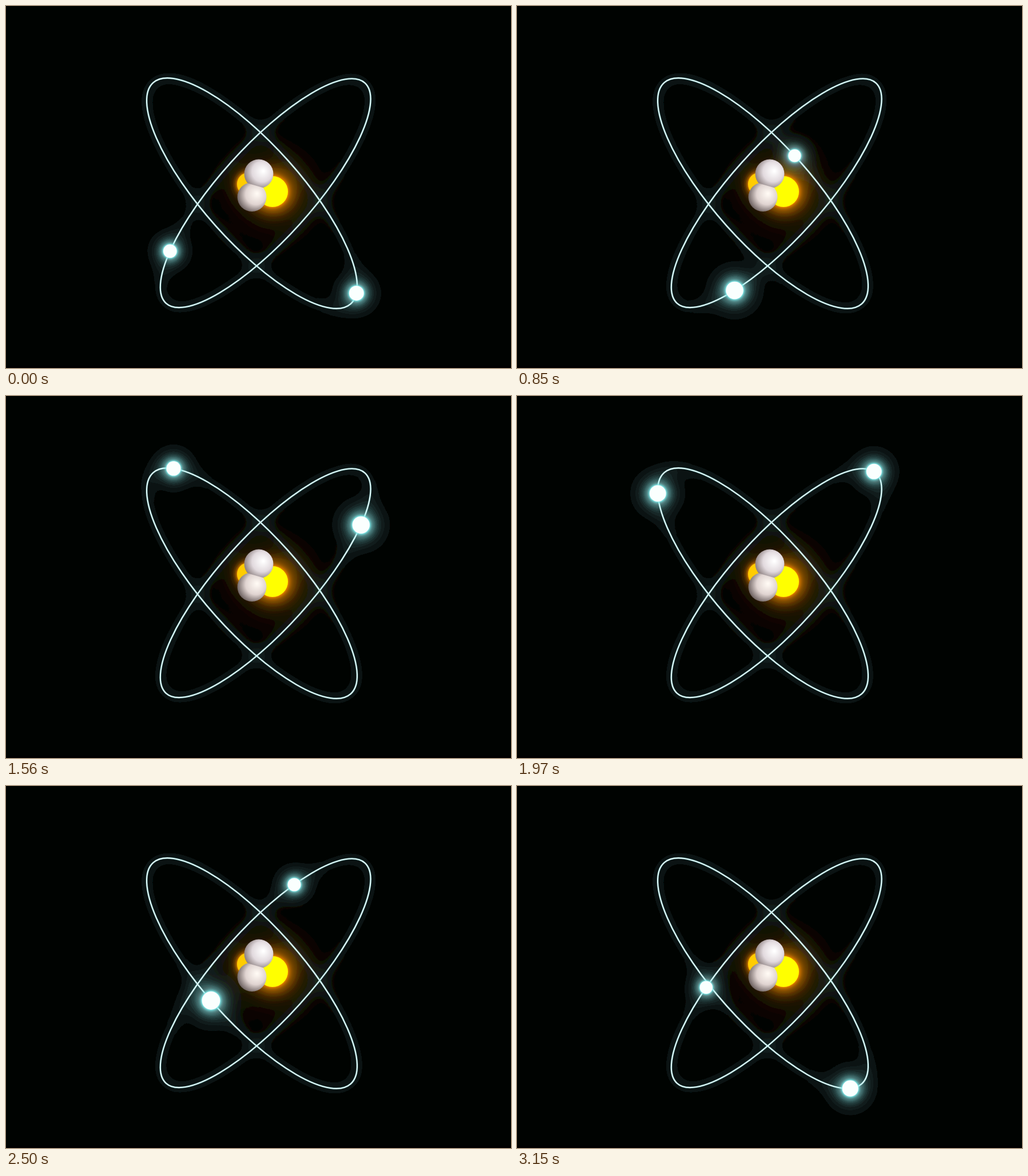
An HTML page with a canvas for the animation above (3250 ms loop, 883 by 634 pixels).

```html
<!DOCTYPE html>
<html lang="en">
<head>
<meta charset="utf-8">
<title>Atom</title>
<style>
  html, body { margin: 0; width: 100%; height: 100%; overflow: hidden; background: #000; }
  canvas { position: absolute; left: 0; top: 0; }
  #glow { filter: url(#bands); }
</style>
</head>
<body>
<svg width="0" height="0" style="position:absolute">
  <filter id="bands" x="0" y="0" width="100%" height="100%" color-interpolation-filters="sRGB">
    <feComponentTransfer>
      <feFuncR type="discrete"/><feFuncG type="discrete"/><feFuncB type="discrete"/>
    </feComponentTransfer>
  </filter>
</svg>
<canvas id="glow" width="883" height="634"></canvas>
<canvas id="scene" width="883" height="634"></canvas>
<script>
const W = 883, H = 634, LOOP = 3250, LAST = 3150;
const TAU = Math.PI * 2, RAD = Math.PI / 180;
const DEPTH = 0.18;     // perspective strength of the tilted orbits
const SPEED = -0.1058;  // degrees per ms
const CYAN = '157,255,255', ORANGE = '255,135,0';

const orbits = [
  { x: 430, y: 328, major: 259.5, minor: 85.3, tilt: 48.3 * RAD, start: -3.2 },
  { x: 453.7, y: 327.7, major: 259.7, minor: 80.9, tilt: -48 * RAD, start: 216 }
];

const glow = document.getElementById('glow').getContext('2d');
const scene = document.getElementById('scene').getContext('2d');

// Colour bands of the glow: a dark floor, then even steps
function setBands(tag, count, floor, first, step) {
  const values = Array.from({ length: count }, (_, i) => (i ? first + step * (i - 1) : floor) / 255);
  document.querySelector(tag).setAttribute('tableValues', values.join(' '));
}
setBands('feFuncR', 13, 0, 11, 6);
setBands('feFuncG', 8, 3, 19, 10);
setBands('feFuncB', 8, 2, 19, 10);

function layer(paint) {
  const c = document.createElement('canvas');
  c.width = W;
  c.height = H;
  paint(c.getContext('2d'));
  return c;
}

function disc(g, x, y, r, fill) {
  g.fillStyle = fill;
  g.beginPath();
  g.arc(x, y, r, 0, TAU);
  g.fill();
}

// Full light up to the core, then exponential falloff
function halo(g, x, y, color, core, fall) {
  const end = core + 4.5 * fall, n = 30;
  const fill = g.createRadialGradient(x, y, 0, x, y, end);
  for (let i = 0; i <= n; i++) {
    const alpha = i < n ? Math.min(1, Math.exp((core - end * i / n) / fall)) : 0;
    fill.addColorStop(i / n, `rgba(${color},${alpha.toFixed(4)})`);
  }
  disc(g, x, y, end, fill);
}

// Shaded sphere lit from the offset (lx, ly)
function ball(g, x, y, r, lx, ly, light, mid, dark) {
  const fill = g.createRadialGradient(x + lx, y + ly, 1, x + lx * 0.6, y + ly * 0.6, r * 1.25);
  fill.addColorStop(0, light);
  fill.addColorStop(0.55, mid);
  fill.addColorStop(1, dark);
  disc(g, x, y, r, fill);
}

function ring(g, o, width, color) {
  g.lineWidth = width;
  g.strokeStyle = color;
  g.beginPath();
  g.ellipse(o.x, o.y, o.major, o.minor, o.tilt, 0, TAU);
  g.stroke();
}

const stillGlow = layer(g => {
  g.fillStyle = '#000';
  g.fillRect(0, 0, W, H);
  g.globalCompositeOperation = 'lighter';
  g.filter = 'blur(11.8px)';
  for (const o of orbits) ring(g, o, 4.9, `rgb(${CYAN})`);
  g.filter = 'none';
  halo(g, 468, 324, ORANGE, 38, 20);
  halo(g, 424, 312, ORANGE, 20, 10);
});

const rings = layer(g => {
  for (const o of orbits) {
    ring(g, o, 3.4, 'rgba(110,200,200,.45)');
    ring(g, o, 2.1, '#e6ffff');
  }
  g.fillStyle = '#000';
  g.fillRect(0, 630, W, 4);
});

const nucleus = layer(g => {
  halo(g, 424, 312, '255,140,0', 19, 3);
  halo(g, 466, 325, '255,140,0', 26, 7);
  disc(g, 424, 312, 20, '#ffcc00');
  disc(g, 466, 325, 27, '#ff0');
  ball(g, 430, 334.5, 25.5, 9, -6, '#fffaf4', '#e0d4d1', '#6c6160');
  // The spheres cut into each other along a straight seam
  g.translate(436, 314.25);
  g.rotate(Math.atan2(12, 40.5));
  g.beginPath();
  g.rect(-60, -80, 120, 80);
  g.clip();
  g.resetTransform();
  ball(g, 442, 294, 25.5, 8, -5, '#fff', '#e2dade', '#857878');
});

function electron(o, t) {
  const a = (o.start + SPEED * t) * RAD;
  const scale = 1 / (1 - DEPTH * Math.sin(a));
  const u = o.major * Math.sqrt(1 - DEPTH * DEPTH) * Math.cos(a) * scale;
  const v = o.minor * (Math.sin(a) - DEPTH) * scale;
  const c = Math.cos(o.tilt), s = Math.sin(o.tilt);
  return { x: o.x + u * c - v * s, y: o.y + u * s + v * c, r: 13.9 * scale };
}

function draw(t) {
  glow.globalCompositeOperation = 'source-over';
  glow.drawImage(stillGlow, 0, 0);
  glow.globalCompositeOperation = 'lighter';
  scene.clearRect(0, 0, W, H);
  scene.drawImage(rings, 0, 0);
  for (const o of orbits) {
    const { x, y, r } = electron(o, t);
    halo(glow, x, y, CYAN, r * 1.37, r * 0.84);
    halo(scene, x, y, '130,235,235', r * 0.95, r * 0.26);
    disc(scene, x, y, r * 0.94, '#fafffe');
  }
  scene.drawImage(nucleus, 0, 0);
}

// The last pose rests until the loop jumps back to the start
function frame() {
  draw(Math.min(performance.now() % LOOP, LAST));
  requestAnimationFrame(frame);
}
frame();
</script>
</body>
</html>
```
